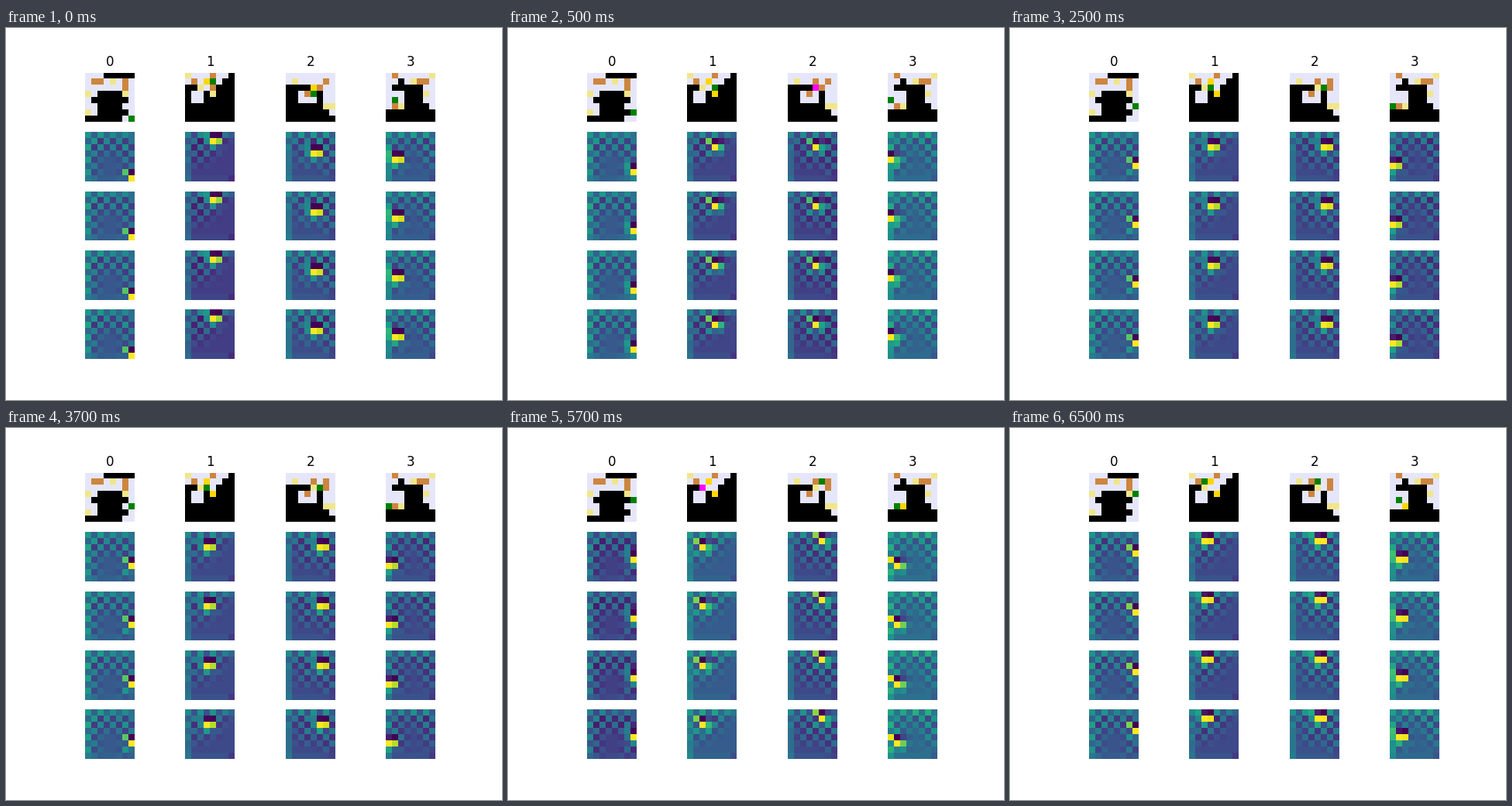
Write a matplotlib script that moves like this. It is 640 px wide and 480 px high and loops after 8000 ms.

```python
import numpy as np
import matplotlib.pyplot as plt
from matplotlib.animation import FuncAnimation
from matplotlib.colors import to_rgb

SIZE = 8
MOVES = {"U": (-1, 0), "D": (1, 0), "L": (0, -1), "R": (0, 1)}

# How the agent shifts the attention of the 3 x 3 cells around it.
AGENT_KERNEL = np.array([[.32, -.45, -.3],
                         [.05, 1, .5],
                         [.1, .15, .1]])

# Cells are (row, column), walls (row, first column, last column);
# "base" is the attention on plain walls after each move.
LEVELS = [
    dict(walls=[(0, 3, 7), (3, 2, 5), (4, 1, 6), (5, 2, 5), (6, 2, 6), (7, 0, 5)],
         boxes=[(1, 1), (1, 2), (1, 6), (2, 6)],
         goals=[(1, 4), (3, 0), (3, 6), (6, 0)],
         start=(7, 7), moves="UUUU", base=(.27, .28, .28, .19, .26)),
    dict(walls=[(0, 7, 7), (1, 6, 7), (2, 0, 1), (2, 5, 7), (3, 0, 0), (3, 3, 3),
                (3, 5, 7), (4, 0, 0), (4, 3, 7), (5, 0, 7), (6, 0, 7), (7, 0, 7)],
         boxes=[(0, 4), (1, 1), (1, 3), (2, 4)],
         goals=[(0, 0), (1, 3), (2, 2), (3, 4)],
         start=(1, 4), moves="DLLU", base=(.18, .21, .22, .29, .22)),
    dict(walls=[(2, 0, 3), (3, 0, 1), (3, 5, 5), (4, 0, 1), (4, 5, 5), (5, 0, 5),
                (6, 0, 6), (7, 0, 7)],
         boxes=[(1, 6), (2, 4), (2, 5), (3, 3)],
         goals=[(1, 1), (2, 4), (5, 6), (5, 7)],
         start=(3, 4), moves="URUL", base=(.24, .19, .22, .22, .25)),
    dict(walls=[(1, 2, 2), (2, 1, 5), (3, 3, 5), (4, 3, 5), (5, 3, 6),
                (6, 0, 7), (7, 0, 7)],
         boxes=[(0, 1), (1, 5), (1, 6), (5, 1)],
         goals=[(0, 7), (1, 4), (3, 6), (5, 2)],
         start=(4, 1), moves="LDRU", base=(.27, .32, .22, .34, .31)),
]


def play(level):
    """Yield the agent and the boxes after each move."""
    agent, boxes = level["start"], set(level["boxes"])
    yield agent, set(boxes)
    for move in level["moves"]:
        dr, dc = MOVES[move]
        agent = agent[0] + dr, agent[1] + dc
        if agent in boxes:
            boxes.remove(agent)
            boxes.add((agent[0] + dr, agent[1] + dc))
        yield agent, set(boxes)


def floor_mask(level):
    floor = np.ones((SIZE, SIZE))
    for row, first, last in level["walls"]:
        floor[row, first:last + 1] = 0
    return floor


def draw_board(level, agent, boxes):
    board = np.where(floor_mask(level)[..., None] > 0, to_rgb("lavender"), 0.0)
    goals = level["goals"]
    for spot in goals:
        board[spot] = to_rgb("khaki")
    for spot in boxes:
        board[spot] = to_rgb("gold" if spot in goals else "peru")
    board[agent] = to_rgb("magenta" if agent in goals else "green")
    return board


def draw_heat(level, base, agent):
    # Open ground shows a checkered ripple that fades into the walls.
    padded = np.pad(floor_mask(level), 1)
    openness = sum(padded[r:r + SIZE, c:c + SIZE]
                   for r in range(3) for c in range(3)) / 9
    rows, cols = np.indices((SIZE, SIZE))
    ripple = np.where((rows + cols) % 2, -1, 1)
    heat = base + openness * (.06 + .19 * ripple)

    # The edges of the map stand out a little.
    heat[:, 0] += .14
    heat[0, 1:] += .12
    heat[-1] += .03
    heat[-1, -1] -= .08

    around = np.pad(heat, 1)
    row, col = agent
    around[row:row + 3, col:col + 3] += AGENT_KERNEL
    return around[1:-1, 1:-1].clip(0, 1)


steps = [[(draw_board(level, agent, boxes), draw_heat(level, base, agent))
          for base, (agent, boxes) in zip(level["base"], play(level))]
         for level in LEVELS]

fig, axes = plt.subplots(5, 4, figsize=(6.4, 4.8), dpi=100)
images = []
for col, history in enumerate(steps):
    board, heat = history[0]
    axes[0, col].set_title(str(col))
    images.append([axes[0, col].imshow(board)]
                  + [ax.imshow(heat, cmap="viridis", vmin=0, vmax=1)
                     for ax in axes[1:, col]])
for ax in axes.flat:
    ax.axis("off")


def update(n):
    step = (n + 3) // 4
    for history, column in zip(steps, images):
        board, heat = history[step]
        column[0].set_data(board)
        for image in column[1:]:
            image.set_data(heat)
    return [image for column in images for image in column]


anim = FuncAnimation(fig, update, frames=16, interval=500, repeat=True,
                     repeat_delay=0, blit=False)
plt.show()
```
